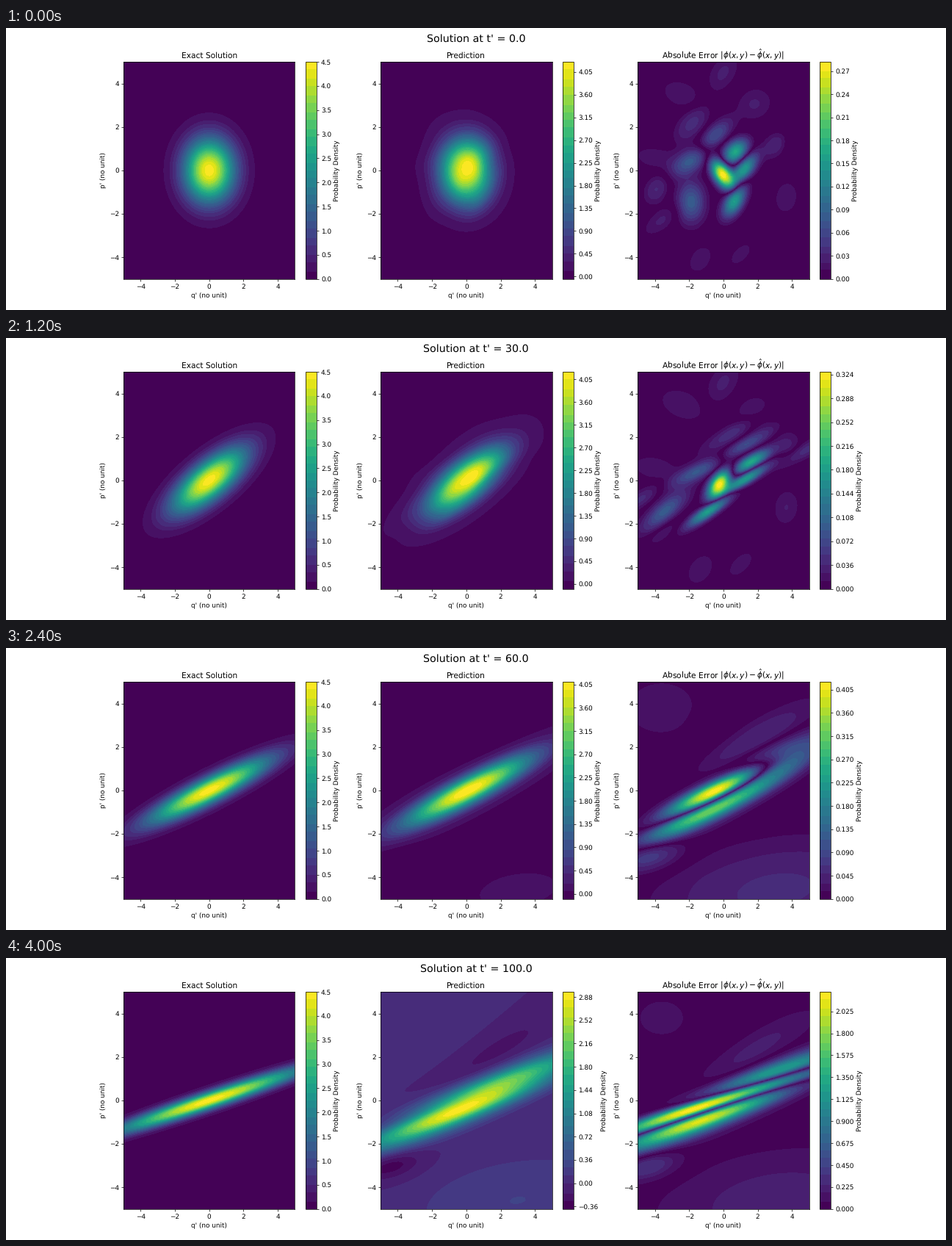
Recreate the animation shown at these times as a matplotlib script. Size 1280x384 px, loop 4200 ms.

```python
import numpy as np
import matplotlib.pyplot as plt
from matplotlib.animation import FuncAnimation
from matplotlib.colors import ListedColormap
from matplotlib.ticker import MaxNLocator

plt.rcParams["text.hinting"] = "none"

FRAMES, INTERVAL, DT = 21, 200, 5.0
SHEAR = 0.0355          # free drift of q' per unit p' and time
PEAK, SIGMA = 4.48, 1.015
LATE = 60               # from here the prediction is a lagging Gaussian
CMAP = ListedColormap(plt.get_cmap("viridis")(np.linspace(0.006, 0.994, 26)))

axis = np.linspace(-5, 5, 141)
Q, P = np.meshgrid(axis, axis)

# Early error lobes, carried by the drift:
# amplitude, q, p, width q, width p, slope
LOBES = [
    (-0.29, -0.05, -0.17, 0.45, 0.39, -0.5),
    (-0.16, 1.2, 0.05, 0.5, 0.36, 0.6),
    (0.17, 0.7, 0.85, 0.5, 0.36, 0.3),
    (0.165, 0.65, -1.38, 0.45, 0.42, 0.6),
    (0.085, -1.9, -1.45, 0.55, 0.65, 0.0),
    (0.08, -1.9, 0.45, 0.75, 0.4, 0.35),
    (-0.07, -0.5, 1.6, 0.65, 0.38, 0.5),
    (0.04, -1.8, 2.2, 0.7, 0.5, 0.5),
    (-0.04, 3.2, 1.3, 0.6, 0.42, 0.4),
    (-0.035, -3.9, -0.85, 0.5, 0.45, 0.3),
]
# Broad background that grows over time
BACKGROUND = [
    (-0.18, 1.8, 2.3, 2.4, 0.6, 0.45),
    (-0.32, -4.5, -3.0, 1.4, 0.5, 0.15),
    (0.2, 3.0, -4.6, 4.5, 1.5, 0.1),
    (0.07, -3.6, 3.8, 2.5, 1.5, 0.0),
]


def blob(q, p, a, q0, p0, sq, sp, slope):
    """Gaussian whose ridge runs along p = p0 + slope * (q - q0)."""
    u = (q - q0) / sq
    v = (p - p0 - slope * (q - q0)) / sp
    return a * np.exp(-0.5 * (u * u + v * v))


def blobs(q, p, items):
    return sum(blob(q, p, *b) for b in items)


def scatter(n):
    """Faint spots around the rim."""
    rng = np.random.default_rng(4)
    for k in range(n):
        ang = 2 * np.pi * (k + rng.uniform(0, 0.6)) / n
        r = rng.uniform(3.3, 4.8)
        yield (rng.uniform(0.014, 0.024) * (-1) ** k, r * np.cos(ang),
               r * np.sin(ang), rng.uniform(0.5, 1.0),
               rng.uniform(0.3, 0.6), rng.uniform(-0.3, 0.5))


SPOTS = list(scatter(9))


def drift(dt):
    return Q - SHEAR * dt * P


def exact(q, p, t):
    q = q - SHEAR * t * p
    return PEAK * np.exp(-0.5 * (q * q + p * p) / SIGMA**2)


def late_error(t):
    s = max(t, LATE)
    q = drift(t - s)

    def at(*values):
        return np.interp(s, [60, 80, 100], values)

    guess = blob(q, P, at(4.11, 3.65, 3.0), at(0.1, 0.2, 0.3),
                 at(-0.015, -0.03, -0.05), at(2.53, 3.2, 3.8),
                 at(0.468, 0.43, 0.5), at(0.395, 0.35, 0.33))
    return guess - exact(q, P, s)


def deviation(t, top):
    """Prediction minus exact solution, scaled to the given largest size."""
    w = np.clip((t - 30) / 35, 0, 1)
    w = w * w * (3 - 2 * w)
    early = blobs(drift(t), P, LOBES) + blobs(Q, P, SPOTS)
    z = (1 - w) * early + w * late_error(t)
    z = z + max(0, (t - 40) / 60) * blobs(Q, P, BACKGROUND)
    return z * top / np.abs(z).max()


def error_top(t):
    return 0.9995 * np.interp(
        t, [0, 10, 25, 50, 60, 65, 70, 80, 90, 100],
        [0.282, 0.307, 0.328, 0.328, 0.42, 0.52, 0.68, 1.17, 1.68, 2.225])


def prediction_range(t):
    when = [0, 20, 30, 50, 60, 80, 100]
    lo = np.interp(t, when, [-0.05, -0.05, -0.1, -0.1, -0.1, -0.24, -0.4])
    hi = np.interp(t, when, [4.25, 4.25, 4.2, 4.2, 4.1, 3.64, 2.96])
    return lo + 0.003, hi - 0.003


def panel(index, z, lo, hi, title):
    ax = fig.add_subplot(1, 3, index)
    lev = MaxNLocator(101, min_n_ticks=1).tick_values(lo, hi)
    first = np.searchsorted(lev, lo, side="right") - 1
    last = np.searchsorted(lev, hi)
    lev = lev[max(first, 0):last + 1]
    cs = ax.contourf(Q, P, np.clip(z, lo, hi), levels=lev, cmap=CMAP)
    fig.colorbar(cs, ax=ax, label="Probability Density")
    ax.set_title(title)
    ax.set_xlabel("q' (no unit)")
    ax.set_ylabel("p' (no unit)")


def draw(i):
    fig.clear()
    t = i * DT
    top = error_top(t)
    truth = exact(Q, P, t)
    dev = deviation(t, top)
    fig.suptitle(f"Solution at t' = {t:.1f}", fontsize=16)
    panel(1, truth, 0, PEAK, "Exact Solution")
    panel(2, truth + dev, *prediction_range(t), "Prediction")
    panel(3, np.abs(dev), 0, top,
          r"Absolute Error $|\phi(x,y) - \hat{\phi}(x,y)|$")
    return []


fig = plt.figure(figsize=(20, 6), dpi=64)
anim = FuncAnimation(fig, draw, frames=FRAMES, interval=INTERVAL,
                     init_func=lambda: [], repeat=True)
plt.show()
```
